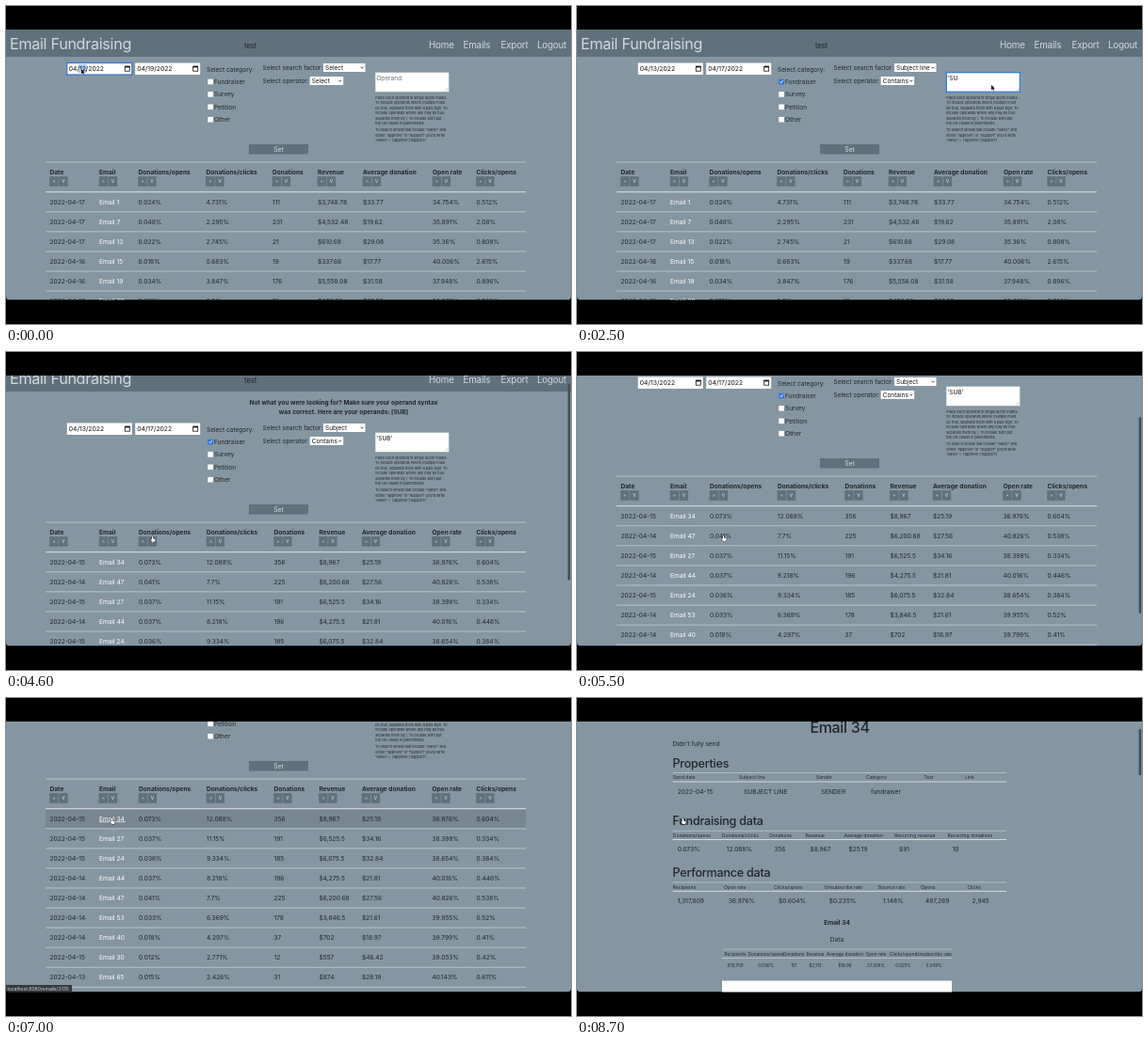
These frames come from a looping animation (600x338 px, 9.1 s). An HTML page with a canvas:

```html
<!DOCTYPE html>
<html lang="en">
<head>
<meta charset="utf-8">
<title>Email Fundraising</title>
<style>
html, body { margin: 0; width: 100%; height: 100%; overflow: hidden; background: #000; }
canvas { display: block; width: 600px; height: 338px; }
</style>
</head>
<body>
<canvas width="600" height="338"></canvas>
<script>
const ctx = document.querySelector('canvas').getContext('2d');
const LOOP = 9100, TOP = 25, BOTTOM = 312.5;
const PAGE = '#8496a2', BAR = '#5f717c', INK = '#20272c', PALE = '#d0d9de', LINE = '#c3ccd2', BLUE = '#2f73dc';

// date, id, donations/opens, donations/clicks, donations, revenue, average, open rate, clicks/opens
const parse = rows => rows.trim().split('\n').map(row => row.trim().split(' '));
const allEmails = parse(`
  04-17 1 0.024% 4.731% 111 $3,748.78 $33.77 34.754% 0.512%
  04-17 7 0.048% 2.295% 231 $4,532.48 $19.62 35.891% 2.08%
  04-17 13 0.022% 2.745% 21 $610.68 $29.08 35.36% 0.808%
  04-16 15 0.018% 0.683% 19 $337.68 $17.77 40.006% 2.615%
  04-16 19 0.034% 3.847% 176 $5,558.08 $31.58 37.948% 0.896%
  04-16 20 0.018% 2.5% 18 $496.88 $35.55 38.231% 0.742%`);
const found = parse(`
  04-15 34 0.073% 12.088% 356 $8,967 $25.19 36.976% 0.604%
  04-15 27 0.037% 11.15% 191 $6,525.5 $34.16 38.398% 0.334%
  04-15 24 0.036% 9.334% 185 $6,075.5 $32.84 38.654% 0.384%
  04-14 44 0.037% 8.218% 196 $4,275.5 $21.81 40.016% 0.446%
  04-14 47 0.041% 7.7% 225 $6,200.68 $27.56 40.826% 0.538%
  04-14 53 0.033% 6.369% 178 $3,846.5 $21.61 39.955% 0.52%
  04-14 40 0.018% 4.297% 37 $702 $18.97 39.799% 0.41%
  04-15 30 0.012% 2.771% 12 $557 $46.42 39.053% 0.42%
  04-13 65 0.015% 2.426% 31 $874 $28.19 40.143% 0.611%`);
const byOpens = [...found].sort((a, b) => parseFloat(b[2]) - parseFloat(a[2]));
const byDate = [...found].sort((a, b) => b[0].localeCompare(a[0]));

const headings = ['Date', 'Email', 'Donations/opens', 'Donations/clicks', 'Donations', 'Revenue',
  'Average donation', 'Open rate', 'Clicks/opens'];
const columnsBefore = [46.5, 99, 140.5, 212.5, 283, 331, 379, 453, 499.5];
const columnsAfter = [46.5, 99, 141, 213, 284.5, 332.5, 378, 452.5, 499.5];

const help = ['Place each operand in single quote marks.', 'To include operands where multiple must',
  'be true, separate them with a plus sign. To', 'include operands where any may be true',
  'separate them by |. To include both put', 'the OR clause in parenthesis.',
  'To search emails that include "Halvo" and', 'either "approve" or "support" you\'d write',
  "'Halvo' + ('approve'|'support')"];

// [time, x, y]
const pointerPath = [[0, 80, 67], [100, 81, 67], [300, 81, 67], [500, 158, 66], [800, 158, 66], [1000, 217, 80],
  [1300, 346, 91], [1500, 360, 66], [1700, 358, 66], [1900, 343, 80], [2000, 343, 80], [2200, 440, 84],
  [2900, 440, 84], [3500, 292, 152], [3700, 292, 152], [3900, 180, 141], [4100, 176, 146], [4400, 155, 196],
  [5700, 155, 195], [6000, 200, 130], [6200, 228, 105], [6400, 228, 105], [6700, 114, 130], [7000, 112, 128]];
// [time, offset]
const listScroll = [[4400, 0], [4600, 12], [5100, 48], [5300, 48], [5500, 61], [5700, 84], [5900, 84], [6200, 107]];
const detailScroll = [[8100, 0], [8400, 20], [8700, 47]];

function along(keys, t, field = 1) {
  const next = keys.findIndex(key => key[0] > t);
  if (next < 0) return keys.at(-1)[field];
  if (next === 0) return keys[0][field];
  const a = keys[next - 1], b = keys[next];
  return a[field] + (b[field] - a[field]) * (t - a[0]) / (b[0] - a[0]);
}

function box(x, y, w, h, fill) {
  ctx.fillStyle = fill;
  ctx.fillRect(x, y, w, h);
}

function stroke(points, color, width) {
  ctx.beginPath();
  points.forEach(([x, y]) => ctx.lineTo(x, y));
  ctx.strokeStyle = color;
  ctx.lineWidth = width;
  ctx.stroke();
}

// y is the middle of the capitals
function text(str, x, y, size = 6.5, color = INK, weight = 400, align = 'left') {
  ctx.font = `${weight} ${size}px Inter, sans-serif`;
  ctx.letterSpacing = size > 9 ? `${-0.02 * size}px` : '0px';
  ctx.textAlign = align;
  ctx.fillStyle = color;
  ctx.fillText(str, x, y + size * 0.36);
}

function focusRing(x, y, w, h) {
  ctx.strokeStyle = BLUE;
  ctx.lineWidth = 1.2;
  ctx.strokeRect(x, y, w, h);
}

function header() {
  box(0, TOP, 600, 29, BAR);
  text('Email Fundraising', 4, 40, 16.2, PALE);
  text('test', 253, 42, 7.6);
  [['Home', 449], ['Emails', 485.5], ['Export', 525.5], ['Logout', 564]]
    .forEach(([label, x]) => text(label, x, 41.5, 9.8, PALE));
}

function dateField(x, day, focused, selected) {
  box(x, 60.5, 69, 12.5, '#fff');
  if (selected) box(x + 12, 62, 9, 9, '#a9cbfa');
  text(`04/${day}/2022`, x + 2, 66.7, 6.8, '#111');
  ctx.strokeStyle = '#111';
  ctx.lineWidth = 0.8;
  ctx.strokeRect(x + 61.5, 64.2, 5, 5);
  box(x + 61.5, 63.8, 5, 1.6, '#111');
  if (focused) focusRing(x, 60.5, 69, 12.5);
}

function select(x, y, w, label) {
  box(x, y, w, 9, '#fff');
  text(label, x + 2, y + 4.6, 6.5, '#111');
  const cx = x + w - 3.5, cy = y + 4.5;
  stroke([[cx - 1.4, cy - 0.7], [cx, cy + 0.8], [cx + 1.4, cy - 0.7]], '#222', 0.8);
}

function checkbox(label, y, checked) {
  box(214.3, y - 2.8, 5.6, 5.6, checked ? BLUE : '#fff');
  if (checked) stroke([[215.5, y], [216.7, y + 1.4], [218.8, y - 1.6]], '#fff', 0.9);
  text(label, 221, y + 0.2);
}

function filters(t) {
  dateField(64.8, t < 100 ? 12 : 13, t < 500, t < 500);
  dateField(137.2, t < 700 ? 19 : 17, t >= 500 && t < 900, t >= 500 && t < 900);

  text('Select category:', 213, 67.7);
  ['Fundraiser', 'Survey', 'Petition', 'Other']
    .forEach((label, i) => checkbox(label, 80.5 + i * 13.4, i === 0 && t >= 1000));

  text('Select search factor:', 272.5, 65.7);
  select(337, 61, 44.5, t < 1700 ? 'Select' : t < 4000 ? 'Subject line' : 'Subject');
  text('Select operator:', 272.5, 79.7);
  select(322.7, 75, 35.5, t < 2000 ? 'Select' : 'Contains');

  const typed = t < 2400 ? '' : t < 2500 ? "'S" : t < 2600 ? "'SU" : t < 2800 ? "'SUB" : "'SUB'";
  box(392.3, 70.7, 78, 20.5, '#fff');
  text(typed || 'Operand', 393.2, 76.3, 6.6, typed ? '#111' : '#6c757d');
  stroke([[466.5, 90.3], [469.5, 87.3]], '#888', 0.5);
  if (t >= 2200 && t < 3500) focusRing(392.3, 70.7, 78, 20.5);
  help.forEach((line, i) => text(line, 392.3, 97.5 + i * 5.5 + (i > 5 ? 1.6 : 0), 3.8));

  box(258, 147, 63, 10.5, BAR);
  text('Set', 289.5, 152.4, 6.9, PALE, 400, 'center');
  if (t >= 3500 && t < 4000) focusRing(258, 147, 63, 10.5);
}

function sortButton(x, label) {
  box(x, 181.2, 9.4, 10.6, BAR);
  text(label, x + 4.7, label === '^' ? 187.4 : 186, 6.2, PALE, 400, 'center');
}

function table(emails, columns, hovering) {
  box(42, 165.6, 510, 0.8, LINE);
  headings.forEach((heading, i) => {
    text(heading, columns[i], 176.3, 6.6, INK, 700);
    sortButton(columns[i] - 0.3, '^');
    sortButton(columns[i] + 9.7, 'v');
  });
  if (hovering) box(42, 198, 510, 20.6, '#768792');
  box(42, 197.2, 510, 1, '#dde2e5');
  emails.forEach((email, row) => {
    const y = 208.3 + row * 21.06;
    email.forEach((value, i) => {
      const label = i === 0 ? `2022-${value}` : i === 1 ? `Email ${value}` : value;
      text(label, columns[i], y, 6.6, i === 1 ? '#fff' : INK);
    });
    box(42, y + 10.1, 510, 0.8, LINE);
  });
  if (hovering) box(99, 211.5, 28, 0.6, '#fff');
}

function listPage(t, scroll) {
  const searched = t >= 4000;
  ctx.translate(0, -scroll);
  header();
  if (searched) {
    text('Not what you were looking for? Make sure your operand syntax', 358.5, 65.5, 6.5, INK, 700, 'center');
    text('was correct. Here are your operands: [SUB]', 358.5, 75.5, 6.5, INK, 700, 'center');
    ctx.translate(0, 27);
  }
  filters(t);
  const emails = !searched ? allEmails : t < 4500 ? byDate : t < 6300 ? byOpens : found;
  table(emails, searched ? columnsAfter : columnsBefore, t >= 6700);
}

// Each cell is [x, heading, value]
function summary(title, y, cells) {
  text(title, 101.5, y, 12.6, INK, 500);
  box(101.5, y + 10, 354.5, 0.7, LINE);
  box(101.5, y + 19.3, 354.5, 0.9, '#dde2e5');
  cells.forEach(([x, heading, value]) => {
    text(heading, x, y + 15.2, 5);
    text(value, x + 5, y + 30, 6.6);
  });
}

function detailPage(scroll) {
  ctx.translate(0, -scroll);
  header();
  ctx.translate(0, 47);
  text('Email 34', 279, 31.5, 16, INK, 500, 'center');
  text("Didn't fully send", 101.5, 49);
  summary('Properties', 69.3, [[101.8, 'Send date', '2022-04-15'], [172, 'Subject line', 'SUBJECT LINE'],
    [254, 'Sender', 'SENDER'], [307, 'Category', 'fundraiser'], [368.5, 'Test', ''], [412, 'Link', '']]);
  summary('Fundraising data', 130.8, [[101.8, 'Donations/opens', '0.073%'], [153.7, 'Donations/clicks', '12.088%'],
    [204.2, 'Donations', '356'], [242.5, 'Revenue', '$8,967'], [283.5, 'Average donation', '$25.19'],
    [337, 'Recurring revenue', '$91'], [393.5, 'Recurring donations', '10']]);
  summary('Performance data', 185.6, [[101.8, 'Recipients', '1,317,809'], [156, 'Open rate', '36.976%'],
    [209, 'Clicks/opens', '$0.604%'], [262.7, 'Unsubscribe rate', '$0.235%'], [320, 'Bounce rate', '1.148%'],
    [365, 'Opens', '487,269'], [414.5, 'Clicks', '2,945']]);
  text('Email 34', 276, 239, 6.6, INK, 700, 'center');
  text('Data', 276, 256.5, 6.6, INK, 400, 'center');
  box(154, 266.8, 244, 0.6, LINE);
  box(154, 276.2, 244, 0.8, LINE);
  [[168, 'Recipients', '876,709'], [200.5, 'Donations/opens', '0.036%'], [230, 'Donations', '117'],
    [253, 'Revenue', '$2,113'], [284.5, 'Average donation', '$18.06'], [317.5, 'Open rate', '37.306%'],
    [346.5, 'Clicks/opens', '0.625%'], [379, 'Unsubscribe rate', '0.249%']]
    .forEach(([x, heading, value]) => {
      text(heading, x, 272, 4.7, INK, 400, 'center');
      text(value, x, 284.6, 4.5, INK, 400, 'center');
    });
  box(154, 300.5, 244, 120, '#fff');
}

function scrollbar(scroll, pageHeight) {
  const view = BOTTOM - TOP;
  ctx.beginPath();
  ctx.roundRect(596.6, TOP + scroll * view / pageHeight, 2.6, view * view / pageHeight, 1.3);
  ctx.fillStyle = '#424f58';
  ctx.fill();
}

function statusBar() {
  box(0, 305, 70, 7.5, '#353b40');
  text('localhost:8080/emails/3135', 1.5, 309, 5, '#d5d8da');
}

function pointer(x, y, hand) {
  const arrow = 'M0 0V5.2L1.3 4.1L2.2 6L3 5.6L2.2 3.8H3.8Z';
  const finger = 'M0 .4Q.6-.4 1.1 .4V2.4L3.2 2.9Q3.8 3.2 3.6 4.2L3 6H.3L-1.4 3.6Q-1 2.8 0 3.5Z';
  const shape = new Path2D(hand ? finger : arrow);
  ctx.save();
  ctx.translate(x, y);
  ctx.strokeStyle = hand ? '#111' : '#fff';
  ctx.lineWidth = 0.8;
  ctx.stroke(shape);
  ctx.fillStyle = hand ? '#fff' : '#000';
  ctx.fill(shape);
  ctx.restore();
}

function draw(now) {
  const t = Math.floor(now % LOOP / 100) * 100;
  const detail = t >= 7400;
  const scroll = along(detail ? detailScroll : listScroll, t);
  box(0, 0, 600, 338, '#000');
  ctx.save();
  ctx.beginPath();
  ctx.roundRect(0, TOP, 600, BOTTOM - TOP, [0, 0, 4, 4]);
  ctx.clip();
  box(0, TOP, 600, BOTTOM - TOP, PAGE);
  ctx.save();
  if (detail) detailPage(scroll);
  else listPage(t, scroll);
  ctx.restore();
  if (t >= 4500 && t < 6700) scrollbar(scroll, 396);
  if (t >= 8200) scrollbar(scroll, 1681);
  if (t >= 6700 && !detail) statusBar();
  pointer(along(pointerPath, t), along(pointerPath, t, 2), t >= 4400);
  ctx.restore();
  requestAnimationFrame(animate);
}

const start = performance.now();
function animate() {
  draw(performance.now() - start);
}
animate();
</script>
</body>
</html>
```
